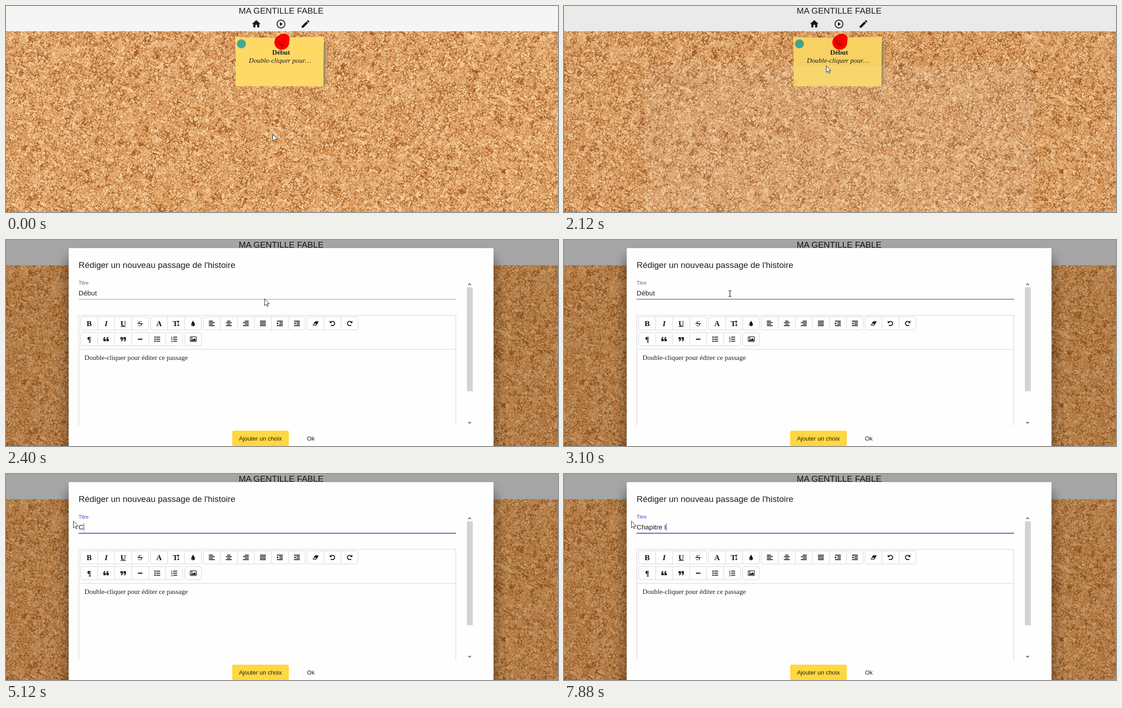
Animation, 1224 px wide and 457 px high, one loop 8 s. Source, as an HTML page with a canvas:

```html
<!DOCTYPE html>
<html lang="fr">
<head>
<meta charset="utf-8">
<title>Éditeur de récit</title>
<style>
html, body { margin: 0; width: 100%; height: 100%; overflow: hidden; }
canvas, svg { position: absolute; left: 0; top: 0; width: 1224px; height: 457px; }
text { font-family: "Liberation Sans", Arial, sans-serif; fill: #1f1f1f; white-space: pre; }
.serif { font-family: "Liberation Serif", "Times New Roman", serif; font-size: 15.14px; }
.glyph { font: bold 17px "Liberation Serif", serif; text-anchor: middle; fill: #111; }
.mid { text-anchor: middle; }
.field { font-size: 15.14px; }
.btn { font-size: 13.25px; }
.line { fill: none; stroke: #d4d4d4; }
</style>
</head>
<body>
<canvas id="cork" width="1224" height="457"></canvas>
<svg viewBox="0 0 1224 457">
  <defs>
    <filter id="blur" x="-20%" y="-20%" width="140%" height="140%"><feGaussianBlur stdDeviation="11"/></filter>
    <linearGradient id="curl">
      <stop offset="0" stop-color="#7d5a2c" stop-opacity=".8"/>
      <stop offset=".45" stop-color="#a59a70" stop-opacity=".75"/>
      <stop offset="1" stop-color="#c8a468" stop-opacity=".2"/>
    </linearGradient>
    <clipPath id="editorClip"><rect x="150" y="150" width="860" height="261.5"/></clipPath>
    <clipPath id="selClip"><rect id="selArea" y="108" height="18"/></clipPath>
  </defs>

  <rect width="1224" height="56" fill="#f5f5f5"/>
  <text class="mid" x="610" y="16.5" font-size="18.93">MA GENTILLE FABLE</text>
  <g fill="#1c1c1c">
    <path transform="translate(543.6 28.5) scale(.946)" d="M10 20v-6h4v6h5v-8h3L12 3 2 12h3v8z"/>
    <path d="M607.5 35.5v9l6.2-4.5z"/>
    <circle cx="609.8" cy="40" r="8.8" fill="none" stroke="#1c1c1c" stroke-width="1.9"/>
    <path transform="translate(652.8 28.5) scale(.946)" d="M3 17.25V21h3.75L17.8 9.94l-3.75-3.75zM20.7 7.04a1 1 0 0 0 0-1.41l-2.34-2.34a1 1 0 0 0-1.41 0l-1.83 1.83 3.75 3.75z"/>
  </g>

  <path d="M703 80q10 0 11 5q-2 46-6 93h-5z" fill="url(#curl)"/>
  <path d="M508 68q50 3 100 2t97-2q-1 55-1 110H509q1-55-1-110z" fill="#ffd966"/>
  <circle cx="522" cy="84" r="10" fill="#41aa93"/>
  <circle cx="611.5" cy="80.5" r="16.5" fill="#f00"/>
  <circle cx="612" cy="79" r="9.5" fill="#b30000"/>
  <circle cx="616.5" cy="73.5" r="12.3" fill="#f00"/>
  <path d="M604 80q9 4 15-7" fill="none" stroke="#c80000" stroke-width="1.3"/>
  <text class="serif mid" x="610" y="108" font-weight="bold">Début</text>
  <text class="serif" x="538.6" y="126" font-style="italic">Double-cliquer pour…</text>
  <g id="dash"><rect x="584" y="112" width="4.5" height="17.5" fill="#0078d7"/><path d="M584.5 122h3" stroke="#e8f2fb"/></g>

  <g id="shade"><rect width="1224" height="56"/><rect y="56" width="1224" height="401" fill="#5a2d00"/></g>

  <g id="dialog">
    <rect x="132" y="34" width="956" height="520" rx="20" opacity=".32" filter="url(#blur)"/>
    <rect x="139" y="18" width="942" height="560" rx="2" fill="#fefefe"/>
    <text x="161" y="62.3" font-size="18.93">Rédiger un nouveau passage de l'histoire</text>
    <text id="label" x="161" y="99" font-size="11.35">Titre</text>
    <text id="title" class="field" x="161" y="122.6"></text>
    <g id="selected" clip-path="url(#selClip)">
      <rect x="161" y="108" width="41" height="18" fill="#0078d7"/>
      <text class="field" x="161" y="122.6" style="fill:#fff">Début</text>
    </g>
    <rect id="caret" y="109" width="1.2" height="17" fill="#673ab7"/>
    <rect id="underline" x="161" width="837"/>
    <g id="editor" clip-path="url(#editorClip)">
      <path class="line" d="M161.5 430V167H997.500V430M161 242.500H998" stroke-width="1.2"/>
      <text class="serif" x="174" y="266">Double-cliquer pour éditer ce passage</text>
    </g>
    <rect x="1022" y="105" width="13" height="230.500" fill="#d3d3d3"/>
    <path d="M1025 100l3-3 3 3M1025 403.500l3 3 3-3" fill="none" stroke="#505050" stroke-width="1.7"/>
    <rect id="add" x="501.500" y="423" width="125.500" height="34" rx="3.500"/>
    <text class="btn" x="516.5" y="445">Ajouter un choix</text>
    <text class="btn" x="667.5" y="445">Ok</text>
  </g>

  <path id="arrow" d="M.5.5V15.600L4 12.300l2.300 5.200 2.200-1-2.300-5h4.800z" fill="#fff" stroke="#111" stroke-width=".95"/>
  <path id="beam" d="M-3-6.500h2L0-5.500l1-1h2M0-5.500V5.500M-3 6.500h2l1-1 1 1h2" fill="none" stroke="#111" stroke-width="1.2"/>
</svg>
<script>
const $ = id => document.getElementById(id);
const set = (id, attrs) => { for (const k in attrs) $(id).setAttribute(k, attrs[k]); };
const show = (id, on) => set(id, { visibility: on ? "visible" : "hidden" });

// Cork: ragged Voronoi chips with soft cracks of uneven width.
function paintCork() {
  const W = 1224, H = 401, S = 7, cols = 180, rows = 62;
  const hash = (x, y, k) => {
    const v = Math.sin(x * 127.1 + y * 311.7 + k * 74.7) * 43758.5453;
    return v - Math.floor(v);
  };
  const chips = [];
  for (let j = 0; j < rows; j++) for (let i = 0; i < cols; i++) chips.push({
    x: (i - 2 + hash(i, j, 1)) * S, y: (j - 2 + hash(i, j, 2)) * S,
    size: .6 + .8 * hash(i, j, 3), tone: hash(i, j, 4), gap: .4 + 2.6 * hash(i, j, 5) ** 2
  });
  const ctx = $("cork").getContext("2d"), img = ctx.createImageData(W, H);
  for (let y = 0, p = 0; y < H; y++) for (let x = 0; x < W; x++) {
    const wx = x + 1.1 * Math.sin(y * .9 + x * .3) + 2 * Math.sin(y * .23 + x * .11);
    const wy = y + 1.1 * Math.sin(x * .8 - y * .4) + 2 * Math.sin(x * .19 - y * .13);
    const ci = Math.floor(wx / S) + 2, cj = Math.floor(wy / S) + 2;
    let d1 = 99, d2 = 99, chip;
    for (let j = cj - 1; j <= cj + 1; j++) for (let i = ci - 1; i <= ci + 1; i++) {
      const c = chips[j * cols + i];
      if (!c) continue;
      const d = Math.hypot(wx - c.x, wy - c.y) * c.size;
      if (d < d1) { d2 = d1; d1 = d; chip = c; } else if (d < d2) d2 = d;
    }
    const crack = Math.max(0, 1 - (d2 - d1) / chip.gap);
    const grain = (hash(x, y, 7) - .5) * 14, v = chip.tone;
    const base = [226 + 20 * v, 162 + 40 * v, 98 + 52 * v], gap = [150, 82, 32];
    base.forEach((c, k) => { img.data[p++] = c + (gap[k] - c) * crack + grain; });
    img.data[p++] = 255;
  }
  ctx.putImageData(img, 0, 56);
}

// Toolbar
const glyph = (s, style = "") => `<text class="glyph" y="5.8" style="${style}">${s}</text>`;
const bar = (x, y, w, h = 1.8) => `<rect x="${x}" y="${y - h / 2}" width="${w}" height="${h}"/>`;
const rowY = [-5, -1.7, 1.7, 5];
const align = (short, k) => rowY.map((y, i) => {
  const w = i % 2 ? 13 : short;
  return bar(-6.5 + (13 - w) * k, y, w);
}).join("");
const indent = tri => bar(-6.5, -5, 13) + bar(-1, -1.7, 7.5) + bar(-1, 1.7, 7.5) + bar(-6.5, 5, 13) + `<path d="${tri}"/>`;
const turn = flip => `<g transform="scale(${flip} 1)"><path d="M-4-2.6A4.8 4.8 0 1 1-3.700 3.300" fill="none" stroke="#111" stroke-width="1.9"/><path d="M-6.200-6v5.300h5.300z"/></g>`;
const quote = angle => `<g transform="rotate(${angle})">` + [0, 6.7].map(x =>
  `<path transform="translate(${x})" d="M-6 4.500V0c0-3 1.300-4.500 4-5v1.800C-3.300-2.800-3.800-2-3.800-.5h3v5z"/>`).join("") + "</g>";
const list = mark => [-4.5, 0, 4.5].map((y, i) => bar(-2.5, y, 9) + mark(y, i)).join("");

const icons = {
  bold: glyph("B"), italic: glyph("I", "font-style:italic"),
  under: glyph("U") + bar(-6, 7, 12, 1.2), strike: glyph("S", "font-weight:normal") + bar(-6.5, .5, 13, 1.2),
  font: glyph("A"),
  height: `<text class="glyph" x="-2" y="5.8">T</text><path d="M5-5V5M3-3.500l2-2.200 2 2.200M3 3.500l2 2.200 2-2.200" fill="none" stroke="#111" stroke-width="1.200"/>`,
  drop: `<path d="M0-6.500C1 -3 4 -.5 4 2.300a4 4 0 0 1-8 0C-4-.5-1-3 0-6.500z"/><path d="M-2 2.500q.2 1.700 2 1.800" stroke="#fff" fill="none"/>`,
  left: align(9, 0), center: align(7, .5), right: align(9, 1), full: align(13, 0),
  indent: indent("M-6.500-3l3.500 3-3.500 3z"), outdent: indent("M-3-3l-3.500 3 3.500 3z"),
  eraser: `<path d="M-1-4.500H7L2 4.500H-6.500z"/><path d="M-3.300.8H2L.8 3h-5.400z" fill="#fff"/>`,
  undo: turn(1), redo: turn(-1),
  para: glyph("¶"), open: quote(0), close: quote(180), rule: bar(-5, 0, 10, 2.3),
  bullets: list(y => `<circle cx="-5" cy="${y}" r="1.500"/>`),
  numbers: list((y, i) => `<text x="-7" y="${y + 2}" font-size="5.5" font-weight="bold">${i + 1}</text>`),
  image: `<rect x="-6.800" y="-5.300" width="13.600" height="10.600" rx="1.200" fill="none" stroke="#111" stroke-width="1.300"/><circle cx="-3.300" cy="-2.300" r="1.400"/><path d="M-5.200 3.800V2l2.400-2.300 1.700 1.700 3.500-3.700 2.800 3v3.100z"/>`
};
const groups = [
  [165.5, 185, "bold italic under strike"], [320.5, 185, "font height drop"],
  [437.5, 185, "left center right full indent outdent"], [667.5, 185, "eraser undo redo"],
  [165.5, 220, "para open close rule bullets numbers"], [396.5, 220, "image"]
];
const PITCH = 37.75;
for (const [x, y, names] of groups) {
  const keys = names.split(" "), w = keys.length * PITCH - (keys.length > 1 ? .5 : 1);
  let out = `<rect class="line" x="${x}" y="${y - 14.5}" width="${w}" height="29" rx="4"/>`;
  keys.forEach((key, i) => {
    const left = x + i * PITCH;
    if (i) out += `<path class="line" d="M${left} ${y - 14.5}v29"/>`;
    out += `<g fill="#111" transform="translate(${left + 18.8} ${y})">${icons[key]}</g>`;
  });
  $("editor").insertAdjacentHTML("beforeend", out);
}

// Timeline: each row holds until the next one.
const pointer = [
  [0, 591, 284], [150, 589, 272], [290, 584, 250], [430, 577, 225], [570, 571, 202], [700, 570, 182],
  [840, 572, 166], [980, 574, 153], [1120, 576, 144], [1270, 579, 137], [1410, 581, 132],
  [2400, 573, 130], [2540, 545, 126], [2680, 490, 122], [2830, 430, 120], [2980, 385, 119], [3100, 368, 119],
  [3230, 340, 118], [3360, 285, 116], [3490, 225, 113], [3610, 181, 110], [3740, 152, 103], [3870, 136, 97], [4140, 149, 104]
];
const opening = [[0, 1, 18, 0, 0], [2120, .916, 133, .09, .04], [2250, .987, 37, .87, .257], [2400, 1, 18, 1, .32]];
const typing = [[0, "Début"], [5120, "C"], [5420, "Ch"], [5880, "Cha"], [6040, "Chap"], [6310, "Chapi"],
  [6440, "Chapit"], [6750, "Chapitr"], [6900, "Chapitre"], [7580, "Chapitre "], [7880, "Chapitre I"]];
const at = (rows, t) => rows.findLast(r => r[0] <= t).slice(1);

function draw() {
  const t = performance.now() % 8000;
  const [x, y] = at(pointer, t), [scale, top, alpha, dim] = at(opening, t), [text] = at(typing, t);
  const focus = t >= 3230, hover = t >= 2540;

  set("shade", { opacity: dim });
  set("dialog", { opacity: alpha, transform: `translate(610 ${top}) scale(${scale}) translate(-610 -18)` });
  $("dialog").style.display = alpha ? "" : "none";
  show("dash", t >= 1970 && t < 2120);

  $("title").textContent = text;
  $("label").style.fill = focus ? "#673ab7" : "#666";
  set("underline", { y: hover ? 130.5 : 131, height: hover ? 1.9 : 1, fill: focus ? "#673ab7" : hover ? "#858585" : "#949494" });
  set("add", { fill: t >= 2400 ? "#ffd740" : "#fefefe", stroke: t >= 2400 ? "none" : "#e8e8e8" });

  const from = Math.max(161, Math.min(202, x)), selecting = focus && t < 5120 && from < 202;
  set("selArea", { x: from, width: 202 - from });
  $("selected").style.display = selecting ? "" : "none";
  $("caret").style.display = focus && !selecting && !(t >= 7460 && t < 7580) ? "" : "none";
  if (focus) set("caret", { x: 161 + $("title").getComputedTextLength() });

  const beam = t >= 2680 && t < 3740, place = `translate(${x} ${y})`;
  show("arrow", !beam);
  show("beam", beam);
  set("arrow", { transform: place });
  set("beam", { transform: place });
  requestAnimationFrame(draw);
}
paintCork();
draw();
</script>
</body>
</html>
```
